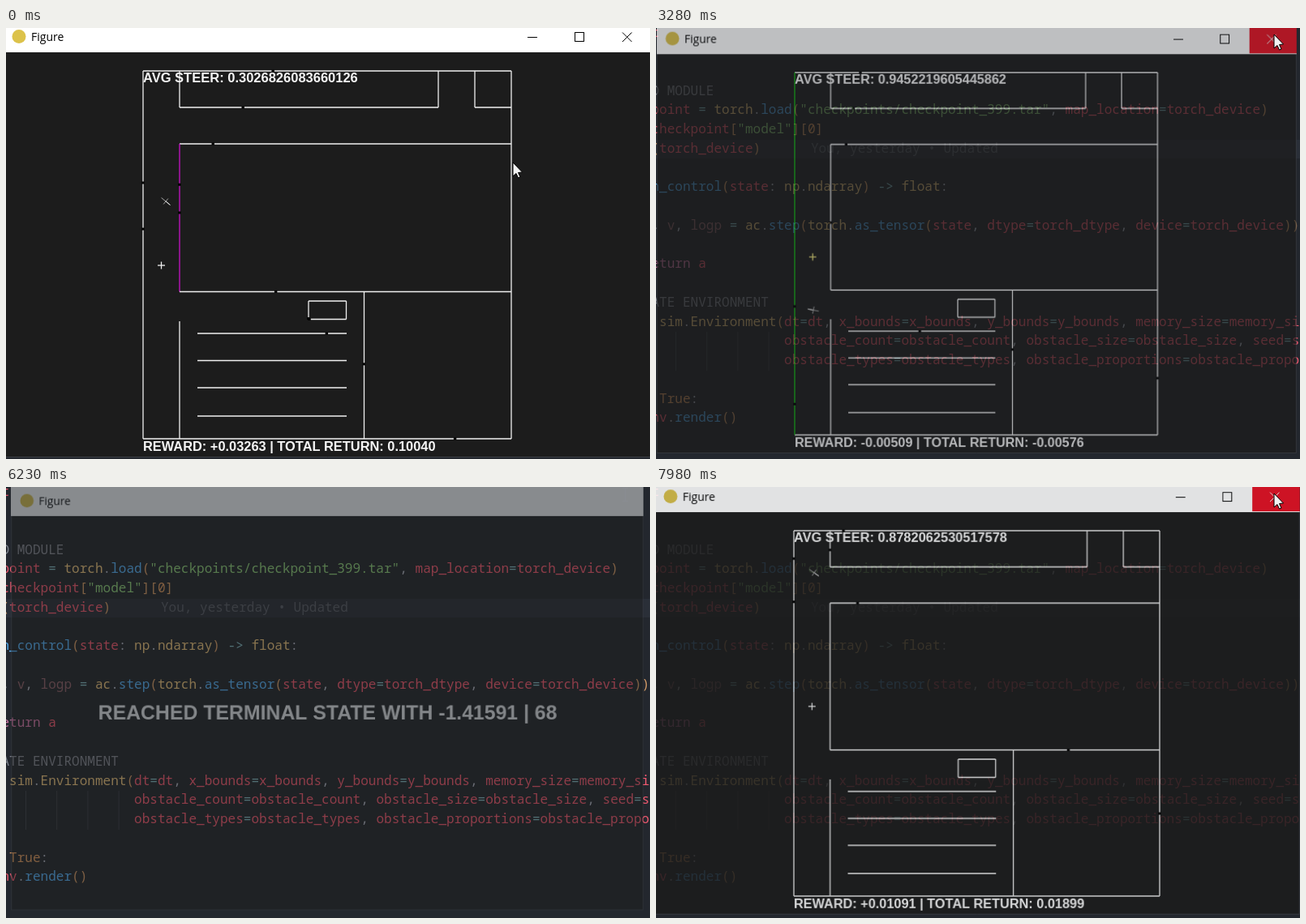
An HTML page with a canvas that plays this animation: 794x532 px, repeating every 8000 ms.

```html
<!DOCTYPE html>
<html lang="en">
<head>
<meta charset="utf-8">
<title>Figure</title>
<style>
  html, body { margin: 0; width: 100%; height: 100%; overflow: hidden; background: #23272e; }
  canvas { display: block; }
</style>
</head>
<body>
<canvas id="stage" width="794" height="532"></canvas>
<script>
const LOOP = 8000, STEP = 69.3, RAD = Math.PI / 180;
const stage = document.getElementById('stage').getContext('2d');
const winCanvas = Object.assign(document.createElement('canvas'), { width: 804, height: 540 });
const win = winCanvas.getContext('2d');
win.translate(4, 8);

// Editor behind the window
const CODE = [
  [-3, 't'],
  [0, 'D MODULE'],
  [1, 'point = torch.load("checkpoints/checkpoint_399.tar", map_location=torch_device)'],
  [2, 'checkpoint["model"][0]'],
  [3, '(torch_device)'],
  [5, 'n_control(state: np.ndarray) -> float:'],
  [7, ', v, logp = ac.step(torch.as_tensor(state, dtype=torch_dtype, device=torch_device))'],
  [9, 'eturn a'],
  [11, 'ATE ENVIRONMENT'],
  [12, ' sim.Environment(dt=dt, x_bounds=x_bounds, y_bounds=y_bounds, memory_size=memory_size'],
  [13, ' '.repeat(17) + 'obstacle_count=obstacle_count, obstacle_size=obstacle_size, seed=seed'],
  [14, ' '.repeat(17) + 'obstacle_types=obstacle_types, obstacle_proportions=obstacle_proportions'],
  [16, ' True:'],
  [17, 'nv.render()']
];
const RULES = [
  [/[A-Z]+ [A-Z]+/y, '#7f848e'],
  [/"[^"]*"/y, '#89ca78'],
  [/(load|step|as_tensor|render|n_control)\b/y, '#52adf2'],
  [/(torch|np|ndarray|ac|sim|Environment|float)\b/y, '#e5c07b'],
  [/(True|\d+)\b/y, '#d8985f'],
  [/(v|logp)\b/y, '#8a6068'],
  [/eturn\b/y, '#cc74a4'],
  [/\w+/y, '#ef596f'],
  [/[()[\]]/y, '#d19a66'],
  [/[=>-]+/y, '#7fb8c0'],
  [/./y, '#abb2bf']
];
const CODE_LEFT = -5.5, CODE_ADVANCE = 9.624;

function drawEditor(g) {
  const lineY = n => 77 + 23.76 * n;
  g.fillStyle = '#23272e';
  g.fillRect(0, 0, 794, 532);
  g.fillStyle = '#2a2f38';
  g.fillRect(0, 138, 794, 23);
  g.fillStyle = '#3b4048';
  for (let i = 0; i < 4; i++) g.fillRect(24 + 38.2 * i, 375, 1, 48);
  g.font = '16.04px "Noto Sans Mono", "DejaVu Sans Mono", monospace';
  g.fillStyle = '#565c66';
  g.fillText('You, yesterday • Updated', 191, lineY(3) + 5.5);
  for (const [n, text] of CODE) {
    let col = 0;
    while (col < text.length) {
      for (const [rule, colour] of RULES) {
        rule.lastIndex = col;
        const token = rule.exec(text);
        if (!token) continue;
        g.fillStyle = colour;
        g.fillText(token[0], CODE_LEFT + CODE_ADVANCE * col, lineY(n) + 5.5);
        col += token[0].length;
        break;
      }
    }
  }
}

// Walls as axis-aligned segments x1, y1, x2, y2
const box = (l, t, r, b) => [[l, t, r, t], [l, b, r, b], [r, t, r, b], [l, t, l, b]];
const LEFT = [169, 53, 169, 507], INNER = [214, 143, 214, 325.5];
const WALLS = [
  ...box(169, 53, 623, 507).slice(0, 3), LEFT,
  ...box(214, 53, 533, 98).slice(1),
  [578, 53, 578, 98], [578, 98, 623, 98],
  [214, 143, 623, 143], INNER, [214, 325.5, 623, 325.5],
  [441.5, 325.5, 441.5, 507], [214, 362, 214, 507],
  ...[377, 410.5, 444, 479].map(y => [236, y, 420, y]),
  ...box(373, 337, 419.5, 359.5)
];

// key: time of the known pose; a and b: [steer, reward, total] there and `span` steps later
const EPISODES = [
  { from: 0, stop: 1535, msg: 1870, result: '-1.20786 | 66', key: 0, span: 19,
    pos: [197, 214], angle: 39.4, rate: 290 / 19, r: 5, drift: [0.19, 0.13], goal: 293,
    a: [0.3026826083660126, 0.03263, 0.10040], b: [0.6262941956520081, -0.07829, -0.03564] },
  { from: 2070, stop: 2215, msg: 2540, result: '-1.05342 | 67', key: 2070, span: 5,
    pos: [194, 178], angle: 24, rate: 12, r: 12, drift: [0, 0], goal: 342,
    a: [0.5127390648215973, 0.01482, 0.01482], b: [0.5894017263348215, -0.03017, -0.04631] },
  { from: 3175, stop: 5495, msg: 5830, result: '-1.41591 | 68', key: 3280, span: 24,
    pos: [192.3, 350.6], angle: 191.2, rate: 414.3 / 24, r: 5, drift: [0.14, -0.03], goal: 284, tint: '#e8e078',
    a: [0.9452219605445862, -0.00509, -0.00576], b: [0.6776103377342224, -0.08872, -0.40361] },
  { from: 6320, stop: 6775, msg: 7100, result: '-1.03127 | 69', key: 6560, span: 6,
    pos: [196, 307], angle: 9.9, rate: 5.4, r: 30, drift: [0, 0], goal: 425.5,
    a: [0.12410448491573334, 0.00638, 0.01723], b: [0.23718560429174038, -0.01264, -0.02215] },
  { from: 7830, stop: 8000, msg: 9000, key: 7980, span: 6,
    pos: [194.2, 105.3], angle: 34.9, rate: 17, r: 6, drift: [0, 0], goal: 271.4,
    a: [0.8782062530517578, 0.01091, 0.01899], b: [0.8316420719385147, 0.02174, 0.06348] }
];
// Window reopenings: closing start, closing length, opening start
const REOPENS = [[3000, 170, 3180], [6030, 300, 6330], [7570, 250, 7841]];

function label(g, text, x, y, size, align = 'left') {
  g.font = `bold ${size}px "Liberation Sans", Arial, sans-serif`;
  g.textAlign = align;
  g.fillStyle = '#f4f4f4';
  g.fillText(text, x, y);
  g.textAlign = 'left';
}

function line(g, x1, y1, x2, y2, colour, width = 1.3) {
  g.strokeStyle = colour;
  g.lineWidth = width;
  g.beginPath();
  g.moveTo(x1, y1);
  g.lineTo(x2, y2);
  g.stroke();
}

function pose(ep, n) {
  const a0 = ep.angle * RAD, a = (ep.angle + ep.rate * n) * RAD;
  return {
    a,
    x: ep.pos[0] + ep.r * (Math.sin(a) - Math.sin(a0)) + ep.drift[0] * n,
    y: ep.pos[1] - ep.r * (Math.cos(a) - Math.cos(a0)) + ep.drift[1] * n
  };
}

function drawSim(g, ep, t) {
  const n = Math.floor((Math.min(t, ep.stop) - ep.key) / STEP + 0.1);
  const { a, x, y } = pose(ep, n);
  const tilt = Math.abs(((a / RAD + 45) % 90 + 90) % 90 - 45);
  for (const w of WALLS) {
    const colour = w === LEFT && tilt < 15 ? '#14b414'
      : w === INNER && y > 143 && y < 325 ? '#c814c8' : '#f0f0f0';
    line(g, ...w, colour);
  }
  // The two sensor axes leave a dark notch on every wall they cross
  g.fillStyle = '#000';
  for (const ray of [a, a + Math.PI / 2]) {
    const slope = Math.tan(ray);
    for (const [x1, y1, x2, y2] of WALLS) {
      const hx = x1 === x2 ? x1 : x + (y1 - y) / slope;
      const hy = x1 === x2 ? y + (x1 - x) * slope : y1;
      if (hx >= x1 && hx <= x2 && hy >= y1 && hy <= y2) g.fillRect(hx - 1.8, hy - 1.5, 3.4, 3);
    }
  }
  const c = Math.cos(a), s = Math.sin(a);
  line(g, x - 7 * c, y - 7 * s, x + 7 * c, y + 7 * s, '#a8a8a8', 1);
  line(g, x, y, x + 7 * c, y + 7 * s, '#e8e8e8', 1);
  line(g, x + 4.5 * s, y - 4.5 * c, x - 4.5 * s, y + 4.5 * c, '#a0a0a0', 1);
  const tint = ep.tint || '#f0f0f0';
  line(g, 187, ep.goal, 196, ep.goal, tint);
  line(g, 191.5, ep.goal - 4.5, 191.5, ep.goal + 4.5, tint);

  const u = n / ep.span;
  const [steer, reward, total] = ep.a.map((v, i) => v * (1 - u) + ep.b[i] * u);
  const gain = reward + 0.05 * Math.sin(4 * Math.PI * u);
  label(g, 'AVG STEER: ' + steer, 169, 66.5, 16.5);
  label(g, `REWARD: ${gain < 0 ? '' : '+'}${gain.toFixed(5)} | TOTAL RETURN: ${total.toFixed(5)}`, 169, 521.5, 16.4);
}

function drawButtons(g, hover) {
  if (hover) {
    g.fillStyle = '#e81123';
    g.fillRect(738, -8, 59, 37);
  }
  line(g, 643, 11.5, 655, 11.5, '#000', 1);
  g.strokeRect(701.5, 5.5, 11, 11);
  const ink = hover ? '#fff' : '#000';
  line(g, 760, 5.5, 771.5, 17, ink, 1);
  line(g, 760, 17, 771.5, 5.5, ink, 1);
}

function drawWindow(g, t) {
  const ep = EPISODES.filter(e => e.from <= t).pop();
  g.fillStyle = '#1c1c1c';
  g.fillRect(-4, -8, 801, 538);
  g.fillStyle = '#fff';
  g.fillRect(-4, -8, 801, 38);
  line(g, -4, 529.5, 797, 529.5, '#3a3d42', 1);
  line(g, -3.5, 30, -3.5, 529, '#3a3d42', 1);
  line(g, 796.5, 30, 796.5, 529, '#3a3d42', 1);
  g.fillStyle = '#dcc24a';
  g.beginPath();
  g.arc(16, 10.5, 8.5, 0, 7);
  g.fill();
  g.fillStyle = '#000';
  g.font = '14px "Open Sans", "Noto Sans", sans-serif';
  g.fillText('Figure', 31, 16);
  if (t >= ep.msg) label(g, 'REACHED TERMINAL STATE WITH ' + ep.result, 397, 288, 25.5, 'center');
  else drawSim(g, ep, t);
}

function drawArrow(g, x, y) {
  g.beginPath();
  for (const [dx, dy] of [[0, 0], [0, 17], [4, 13.5], [6.5, 19], [9, 18], [6.5, 12.5], [11.5, 12]]) g.lineTo(x + dx, y + dy);
  g.closePath();
  g.fillStyle = '#f2f2f2';
  g.fill();
  g.strokeStyle = '#000';
  g.lineWidth = 1;
  g.stroke();
}

function drawTextCursor(g, x, y) {
  const colour = '#8a8d92';
  line(g, x, y, x, y + 15, colour, 1);
  for (const end of [y - 0.5, y + 15.5]) line(g, x - 3.5, end, x + 3.5, end, colour, 1);
}

const clamp = v => Math.max(0, Math.min(1, v));
const ease = u => u * u * (3 - 2 * u);

function draw(t) {
  const slide = ease(clamp(t / 800)), jump = ease(clamp((t - 2000) / 210));
  const cx = 625 + 42 * slide + 95 * jump, cy = 166 + slide - 159 * jump;

  let alpha = 1, closing = false;
  for (const [close, length, open] of REOPENS) {
    if (t < close) continue;
    closing = t < open;
    alpha = closing ? 1 - clamp((t - close) / length) ** 1.55 : 1 - (1 - clamp((t - open) / 220)) ** 2;
  }
  drawEditor(stage);
  drawWindow(win, t);
  if (!closing) drawButtons(win, cx >= 738 && cy < 30);
  const k = 1 - 0.05 * (1 - alpha);
  const [ox, oy] = closing ? [380, 248] : [305, 185];
  stage.save();
  stage.globalAlpha = alpha;
  stage.translate(ox * (1 - k), oy * (1 - k));
  stage.scale(k, k);
  stage.drawImage(winCanvas, -4, -8);
  stage.restore();

  if (closing) drawTextCursor(stage, 763.5, 2);
  else drawArrow(stage, cx, cy);
}

const start = performance.now();
function tick() {
  draw((performance.now() - start) % LOOP);
  requestAnimationFrame(tick);
}
tick();
</script>
</body>
</html>
```
